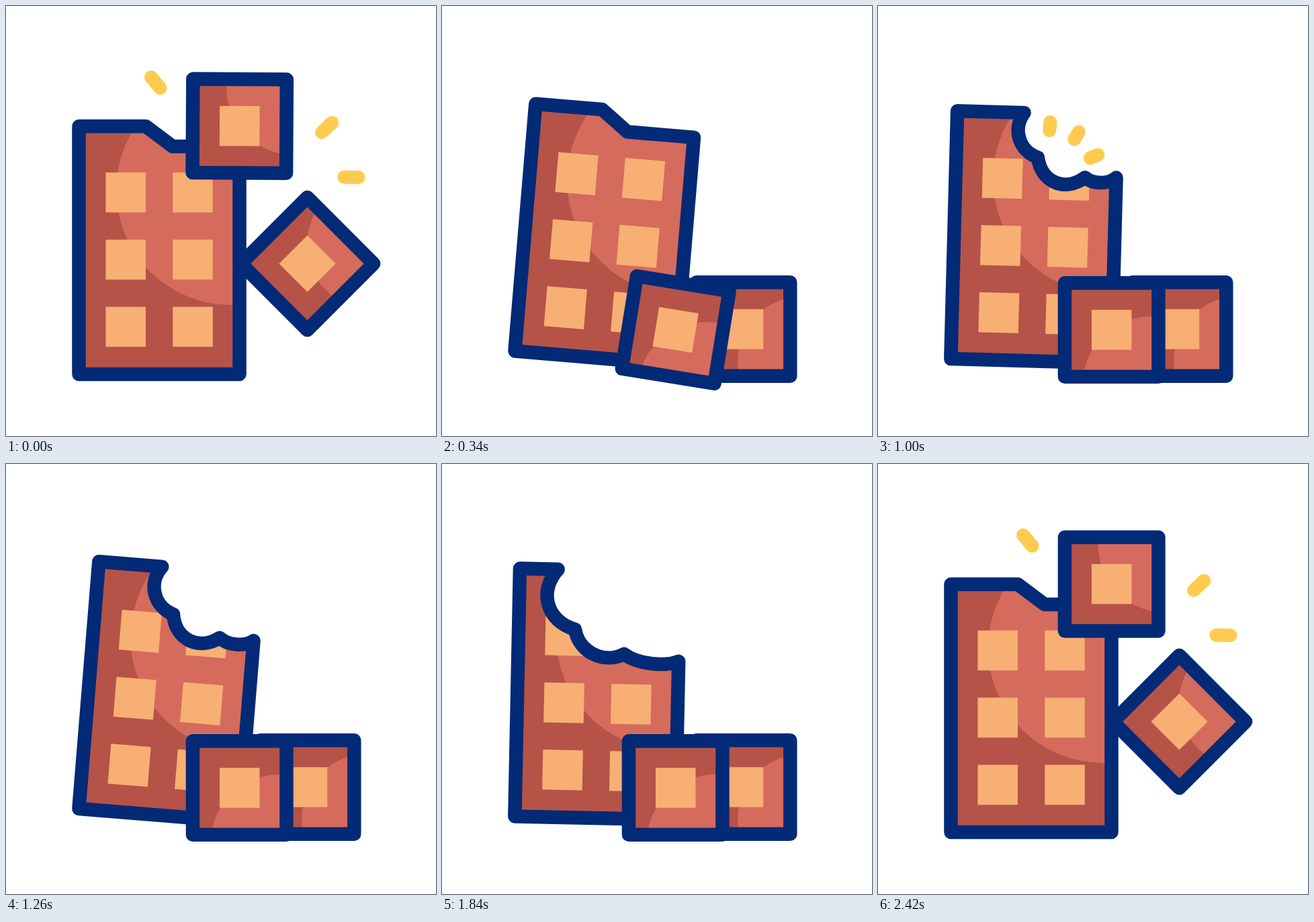
An HTML page with a canvas for the animation above (2.62 s loop, 640x640 px).

```html
<!DOCTYPE html>
<html lang="en">
<head>
<meta charset="utf-8">
<title>Chocolate</title>
<style>
  html, body { margin: 0; height: 100%; overflow: hidden; background: #fff; }
  canvas { display: block; }
</style>
</head>
<body>
<canvas width="640" height="640"></canvas>
<script>
const ctx = document.querySelector('canvas').getContext('2d');
const LOOP = 2620, BEAT = 400;
const NAVY = '#032a76', DARK = '#b55348', LIGHT = '#d56b5d', CREAM = '#f7af74', YELLOW = '#ffcb4f';
const LEFT = 108.5, RIGHT = 347.5, TOP = 179, BOTTOM = 548;

const rad = degrees => degrees * Math.PI / 180;
const mix = (a, b, p) => a + (b - a) * p;
const ramp = (t, from, to) => Math.min(1, Math.max(0, (t - from) / (to - from)));
const smooth = x => x * x * (3 - 2 * x);
const ease = (t, from, to) => smooth(ramp(t, from, to));

// Eases from one pose to the next, one pose per beat.
function pose(t, poses) {
  const i = Math.min(Math.floor(t / BEAT), poses.length - 2);
  return mix(poses[i], poses[i + 1], ease(t, i * BEAT, (i + 1) * BEAT));
}

// Corners of the bar's top edge: x, y and the depth of the scoop leading there.
const NOTCH = [[208, TOP, 0], [248, 209, 0], [300, 209, 0], [RIGHT, 209, 0]];
const BITE_1 = [[208, TOP, 0], [230, 245, 24], [301, 273, 32], [RIGHT, 272, 10]];
const BITE_2 = [[160, TOP, 0], [185.5, 275, 42], [262, 314.5, 31], [RIGHT, 325, 13]];

const morph = (a, b, p) => a.map((corner, i) => corner.map((v, k) => mix(v, b[i][k], p)));

function scoop(path, [x1, y1], [x2, y2, depth]) {
  const dx = x2 - x1, dy = y2 - y1, bulge = depth / Math.hypot(dx, dy);
  const control = p => [x1 + dx * p - dy * bulge, y1 + dy * p + dx * bulge];
  path.bezierCurveTo(...control(0.25), ...control(0.75), x2, y2);
}

// Each dash has an inner end and a direction in degrees.
function dashes(list, size, start, end) {
  if (end <= start) return;
  ctx.strokeStyle = YELLOW;
  ctx.lineWidth = 20 * Math.min(1, (end - start) * 3);
  for (const [x, y, angle] of list) {
    const dx = size * Math.cos(rad(angle)), dy = size * Math.sin(rad(angle));
    ctx.beginPath();
    ctx.moveTo(x + dx * start, y + dy * start);
    ctx.lineTo(x + dx * end, y + dy * end);
    ctx.stroke();
  }
}

// Outlined chocolate with a round highlight and cream squares clipped inside.
function chocolate(outline, [cx, cy, r], squares) {
  ctx.save();
  ctx.clip(outline);
  ctx.fillStyle = DARK;
  ctx.fill(outline);
  ctx.fillStyle = LIGHT;
  ctx.beginPath();
  ctx.arc(cx, cy, r, 0, 7);
  ctx.fill();
  ctx.fillStyle = CREAM;
  for (const [x, y] of squares) ctx.fillRect(x - 29.75, y - 29.75, 59.5, 59.5);
  ctx.restore();
  ctx.strokeStyle = NAVY;
  ctx.lineWidth = 20.5;
  ctx.stroke(outline);
}

function turned(x, y, degrees, paint) {
  ctx.save();
  ctx.translate(x, y);
  ctx.rotate(rad(degrees));
  paint();
  ctx.restore();
}

const SQUARE = new Path2D('M-69.75-69.75h139.5v139.5h-139.5z');
const BAR_SQUARES = [0, 1, 2, 3, 4, 5].map(i => [178.2 + i % 2 * 99.8, 277.5 + (i >> 1) * 100]);

function piece(x, y, degrees, highlight) {
  turned(x, y, degrees, () => chocolate(SQUARE, highlight, [[0, 0]]));
}

function barOutline(t) {
  let edge = morph(NOTCH, BITE_1, ease(t, 600, 800));
  edge = morph(edge, BITE_2, ease(t, 1220, 1420));
  edge = morph(edge, NOTCH, ease(t, 1800, 2000));
  const path = new Path2D();
  path.moveTo(LEFT, BOTTOM);
  path.lineTo(LEFT, TOP);
  path.lineTo(edge[0][0], edge[0][1]);
  for (let i = 1; i < edge.length; i++) scoop(path, edge[i - 1], edge[i]);
  path.lineTo(RIGHT, BOTTOM);
  path.closePath();
  return path;
}

function bar(t) {
  const tilt = pose(t, [0, 5.1, -2.1, 5.1, -2.1, 2.94, 0]);
  const lift = pose(t, [0, 17, 17, 17, 17, 20, 0]);
  const pivotX = 330, pivotY = 538;
  turned(pivotX, pivotY - lift, tilt, () => {
    ctx.translate(-pivotX, -pivotY);
    chocolate(barOutline(t), [335, 274, 171], BAR_SQUARES);
    dashes([[246.4, 204.4, -87], [283.8, 216.4, -61], [308, 243.8, -24]], 12.5,
      ease(t, 1020, 1160), ease(t, 800, 980));
    dashes([[228, 223, -90], [274.5, 236, -55], [303, 268.5, -29]], 17,
      ease(t, 1540, 1720), ease(t, 1340, 1490));
  });
}

function draw(t) {
  ctx.fillStyle = '#fff';
  ctx.fillRect(0, 0, 640, 640);
  ctx.lineCap = ctx.lineJoin = 'round';

  const drop = ramp(t, 0, 320), unfold = ease(t, 1860, 2207);
  const fall = drop * drop - ease(t, 1860, 2220);
  const spin = 100 * drop - 10 * ease(t, 320, 440) - 90 * unfold;

  bar(t);
  piece(448.5, mix(383.5, 481, fall), mix(45, 90, fall), [48, -88.5, 97]);
  piece(347.7, mix(178.7, 482, fall), spin, [82, -59, 102]);
  dashes([[229.5, 122, -130], [470, 188, -43], [503.5, 254.7, 1]], 21,
    0, 1 - ease(t, 0, 200) + unfold);
}

function tick() {
  draw(performance.now() % LOOP);
  requestAnimationFrame(tick);
}
tick();
</script>
</body>
</html>
```
